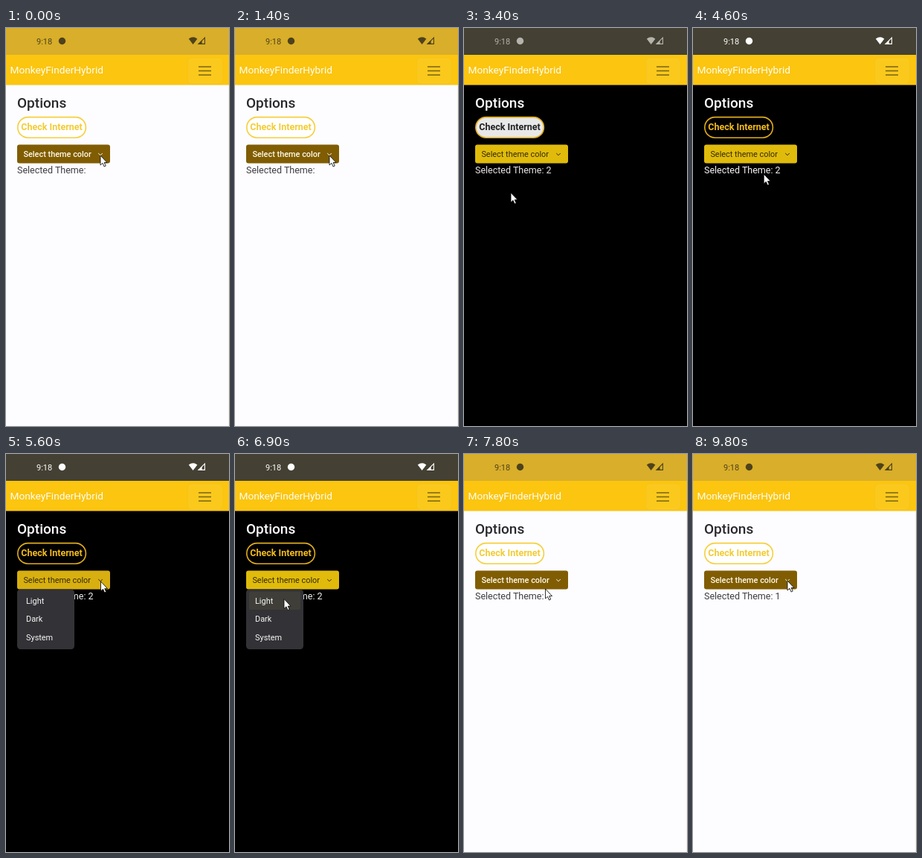
An HTML page that plays this animation: 300x534 px, repeating every 9.9 s.

```html
<!DOCTYPE html>
<html lang="en">
<head>
<meta charset="utf-8">
<title>Theme options</title>
<style>
  html, body { margin: 0; width: 100%; height: 100%; overflow: hidden; }
  svg {
    display: block; width: 300px; height: 534px;
    font: 12.5px Roboto, sans-serif;
    --page: #fdfcff; --status: #d8ae2a; --icon: #4e421c; --head: #29282c; --text: #3f3e42;
    --pill: #fff; --pill-line: #f5d03c; --pill-text: #f2cc35;
    --button: #8c6702; --hover: #805d03; --button-text: #fffbea;
    --menu: #fff; --item: #3c3b40; --row: #fff; --edge: #f6f3e6;
  }
  svg.dark {
    --page: #000; --status: #444033; --icon: #fff; --head: #fff; --text: #f4f4f4;
    --pill: #000; --pill-line: #e0ac1c; --pill-text: #f2ba1c;
    --button: #e0bb0b; --hover: #d8af10; --button-text: #352b08;
    --menu: #333236; --item: #f6f6f6; --row: #3f3e38; --edge: #000;
  }
  svg.settling {
    --icon: #b5b4ac; --text: #e6e6e6;
    --pill: #e8e8e8; --pill-text: #222;
  }
  .small { font-size: 10.92px; }
  #menu { filter: drop-shadow(0 0 1px #0003) drop-shadow(0 7px 8px #0004); }
  .dark #menu { filter: none; }
  #menu text { fill: var(--item); }
  .dark #label { font-weight: 400; }
</style>
</head>
<body>
<svg id="screen" viewBox="0 0 300 534">
  <rect width="300" height="534" fill="var(--page)"/>
  <rect x="299" y="76" width="1" height="458" fill="var(--edge)"/>

  <g fill="var(--icon)">
    <rect width="300" height="36" fill="var(--status)"/>
    <text x="41" y="21.6" font-size="11">9:18</text>
    <circle cx="75.5" cy="17.5" r="4.7"/>
    <path d="M245.8 14.6Q251.6 10 257.4 14.6L251.6 22Z"/>
    <path d="M259 21.4L263.6 16.8V21.4Z"/>
    <path d="M259 21.4L267.4 13V21.4Z" fill="none" stroke="var(--icon)" stroke-width="1.1"/>
  </g>

  <rect y="36" width="300" height="40.5" fill="#fbc510"/>
  <text x="5.5" y="60.5" font-size="13.7" fill="#fffdf2">MonkeyFinderHybrid</text>
  <rect x="246" y="41.5" width="44" height="32" rx="4" fill="#fac91c" stroke="#f7cc35" stroke-width=".8"/>
  <path d="M259 52H276M259 57.5H276M259 63H276" stroke="#776319" stroke-width="1.5"/>

  <text x="15" y="107.3" font-size="19" font-weight="500" fill="var(--head)">Options</text>
  <rect x="15.8" y="119.6" width="91.6" height="27.6" rx="13.8" fill="var(--pill)" stroke="var(--pill-line)" stroke-width="1.6"/>
  <text x="20.3" y="137.4" font-weight="700" fill="var(--pill-text)">Check Internet</text>

  <rect id="button" x="15" y="156.5" width="125" height="25" rx="3"/>
  <text id="label" class="small" x="23.4" y="172.6" font-weight="500" fill="var(--button-text)">Select theme color</text>
  <path d="M124.2 168L127 170.8L129.8 168" fill="none" stroke="var(--button-text)"/>
  <text id="selected" x="15" y="195.4" fill="var(--text)"></text>

  <g id="menu" class="small">
    <rect x="15" y="181.5" width="77" height="80.5" rx="4.5" fill="var(--menu)"/>
    <rect id="row" x="19" width="69" height="24.5" rx="2" fill="var(--row)"/>
    <text x="27" y="200.6">Light</text>
    <text x="27" y="225.3">Dark</text>
    <text x="27" y="250">System</text>
  </g>

  <path id="cursor" d="M0 0V13L3 10.3L5.1 15L7.2 14L5.2 9.6H9Z" fill="#fff" stroke="#000" stroke-width=".8"/>
</svg>
<script>
const LOOP = 9900, STEP = 100;
const DARK_AT = 3300, LIGHT_AT = 7000, SETTLE = 200;
const OPENED = [[1500, DARK_AT], [5400, LIGHT_AT]];
// Pointer stops: time, x, y
const PATH = [
  [0, 127, 171], [2100, 127, 171], [2600, 69, 216.5], [3000, 63, 221],
  [4300, 63, 221], [4900, 127.5, 171], [6200, 127.5, 171], [6700, 66, 194.5],
  [7300, 66, 194.5], [7800, 109.5, 181], [8100, 127, 170], [LOOP, 127, 170]
];
const $ = id => document.getElementById(id);
const within = (t, [from, to]) => t >= from && t < to;

function pointer(t) {
  const i = PATH.findIndex(stop => stop[0] > t);
  const [t0, x0, y0] = PATH[i - 1], [t1, x1, y1] = PATH[i];
  const u = (t - t0) / (t1 - t0), k = u * u * (3 - 2 * u);
  return [x0 + (x1 - x0) * k, y0 + (y1 - y0) * k];
}

function draw(t) {
  const [x, y] = pointer(t);
  const open = OPENED.some(span => within(t, span));
  const screen = $("screen").classList;
  screen.toggle("dark", within(t, [DARK_AT, LIGHT_AT]));
  screen.toggle("settling", within(t, [DARK_AT, DARK_AT + SETTLE]));

  const choice = t < DARK_AT ? "" : t < LIGHT_AT ? " 2" : " 1";
  $("selected").textContent = "Selected Theme:" + choice;

  const overButton = x > 15 && x < 140 && y > 156 && y < 181.5;
  $("button").setAttribute("fill", overButton ? "var(--hover)" : "var(--button)");

  const row = Math.floor((y - 184.5) / 24.7);
  $("menu").style.display = open ? "" : "none";
  $("row").style.display = x < 88 && row >= 0 && row < 3 ? "" : "none";
  $("row").setAttribute("y", 184.5 + row * 24.7);

  $("cursor").setAttribute("transform", `translate(${x} ${y})`);
}

function tick() {
  draw(Math.floor(performance.now() % LOOP / STEP) * STEP);
  requestAnimationFrame(tick);
}
tick();
</script>
</body>
</html>
```
